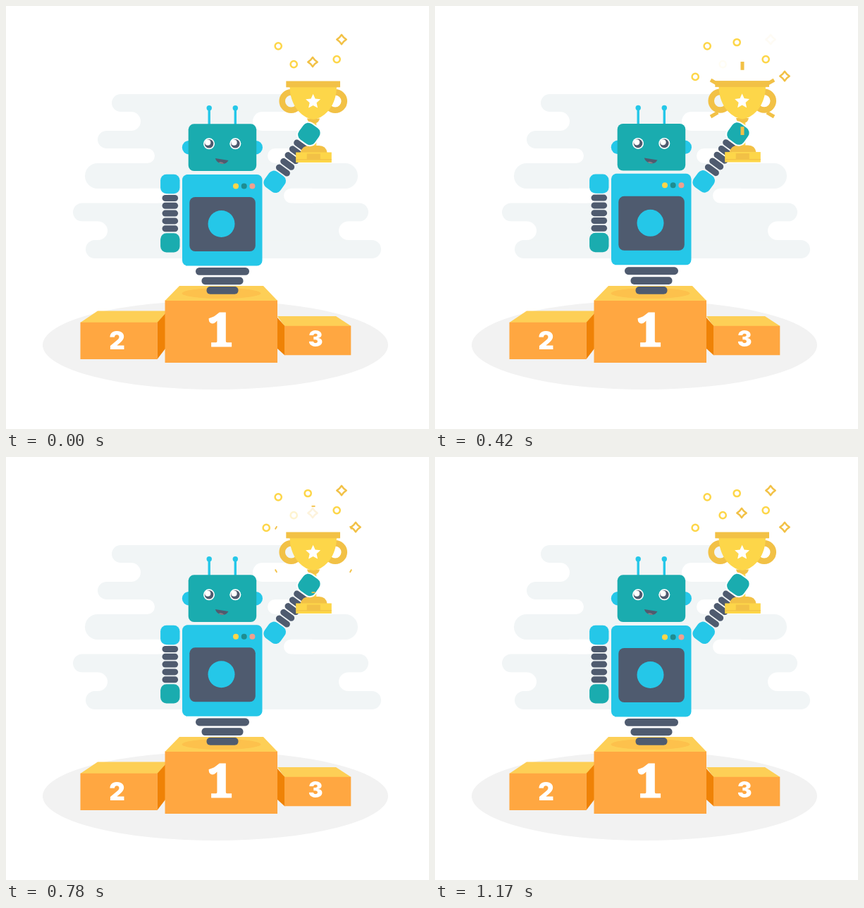
Write an HTML page that moves like this. It is 600 by 600 pixels and loops after 1800 ms.

```html
<!DOCTYPE html>
<html lang="en">
<head>
<meta charset="utf-8">
<title>Robot winner</title>
<style>
html, body { margin: 0; width: 100%; height: 100%; overflow: hidden; background: #fff; }
svg { display: block; width: 100vw; height: 100vh; }
text { fill: #fff; text-anchor: middle; font-weight: 900; }
</style>
</head>
<body>
<svg viewBox="0 0 600 600">
  <defs>
    <g id="coils" fill="#4f5b6f">
      <rect x="-11.3" y="15.5" width="22.6" height="9" rx="4.5"/>
      <rect x="-11.3" y="26.3" width="22.6" height="9" rx="4.5"/>
      <rect x="-11.3" y="37.1" width="22.6" height="9" rx="4.5"/>
      <rect x="-11.3" y="47.9" width="22.6" height="9" rx="4.5"/>
      <rect x="-11.3" y="58.7" width="22.6" height="9" rx="4.5"/>
    </g>
    <rect id="joint" x="-13.7" y="-13.7" width="27.4" height="27.4" rx="8.5"/>
    <g id="eye">
      <circle r="8" fill="#fff"/>
      <circle r="6.3" fill="#4f5b6f"/>
      <circle cx="-1.8" cy="-1.6" r="4.1" fill="#fff"/>
    </g>
  </defs>

  <rect width="600" height="600" fill="#fff"/>
  <g id="cloud"></g>
  <ellipse cx="297" cy="481" rx="245" ry="63" fill="#f2f2f2"/>

  <g id="podium">
    <path d="M105.5 449L130 432.5H229L215 449Z M385 440H468L489.500 454H395Z" fill="#fdcf56"/>
    <path d="M214.500 449L226 436V486L214.500 501Z M385 442L395.500 454V495.500L385 486Z" fill="#ef8206"/>
    <path d="M105.500 448.700H214.800V501H105.500Z M395 453.700H489.300V495.300H395Z M225.500 417.500H385V506H225.500Z" fill="#ffa741"/>
    <path d="M246 397H365L385 418H225.500Z" fill="#fdcf56"/>
    <ellipse cx="305.500" cy="407.500" rx="56" ry="7.500" fill="#fdc14c"/>
    <text x="304" y="481.500" font-family="'Noto Serif', serif" font-size="63" stroke="#fff" stroke-width="3">1</text>
    <text x="157.500" y="487" font-family="Inter, sans-serif" font-size="35">2</text>
    <text x="439" y="482.800" font-family="Inter, sans-serif" font-size="31">3</text>
  </g>

  <g fill="#4f5b6f">
    <rect x="284.500" y="398" width="45" height="10.800" rx="5"/>
    <rect id="coil2" x="277.500" y="384.500" width="59" height="10.800" rx="5"/>
    <rect id="coil1" x="269" y="371" width="76" height="10.800" rx="5.400"/>
  </g>

  <g id="torso">
    <rect x="250" y="239" width="113.500" height="129.500" rx="7.500" fill="#25c7e8"/>
    <rect x="260.300" y="271" width="93.500" height="77" rx="8" fill="#4f5b6f"/>
    <circle cx="326" cy="255.500" r="4" fill="#fdd649"/>
    <circle cx="337.700" cy="255.500" r="4" fill="#1e8d91"/>
    <circle cx="349.400" cy="255.500" r="4" fill="#f0a08f"/>
    <circle cx="305.500" cy="309" r="19" fill="#25c7e8"/>
  </g>

  <g id="upper">
    <g transform="translate(232.800 252.500)">
      <use href="#coils"/>
      <use href="#joint" fill="#25c7e8"/>
      <use href="#joint" y="83.400" fill="#1aacaf"/>
    </g>

    <g fill="#25c7e8">
      <circle cx="259.500" cy="200.700" r="9.700"/>
      <circle cx="354.300" cy="200.700" r="9.700"/>
      <circle cx="288.200" cy="144.800" r="3.700"/>
      <circle cx="325.300" cy="144.800" r="3.700"/>
      <path d="M286.500 145h3.400v23h-3.400z M323.600 145h3.400v23h-3.400z"/>
    </g>
    <rect x="258.700" y="167.300" width="96.500" height="66.700" rx="8" fill="#1aacaf"/>
    <use href="#eye" x="288" y="195.300"/>
    <use href="#eye" x="325.300" y="195.300"/>
    <path d="M296.800 216L315.500 219Q312 225 305.500 223.700Q298.500 222 296.800 216Z" fill="#4f5b6f"/>
    <path d="M301.500 222Q305 219.800 309.500 223.500Q305 224.700 301.500 222Z" fill="#8a7f86"/>

    <g transform="translate(381.200 249.300) rotate(215.800)">
      <use href="#coils"/>
      <use href="#joint" fill="#25c7e8"/>
    </g>

    <g id="trophy">
      <g fill="none" stroke="#f2c146" stroke-width="8.500">
        <circle cx="404.500" cy="135" r="12.800"/>
        <circle cx="467" cy="135" r="12.800"/>
      </g>
      <path d="M432.300 163h8v38h-8z" fill="#fdd649"/>
      <path d="M427 159.500H445Q443.500 166 439 166H433Q428.500 166 427 159.500Z" fill="#f2c146"/>
      <path d="M402.500 114H469C469 139 454 158.500 436 161C417.500 158.500 402.500 139 402.500 114Z" fill="#fdd649"/>
      <rect x="397.300" y="106.500" width="76.700" height="8.800" fill="#f2c146"/>
      <path id="star" fill="#fff"/>
      <path d="M417.500 208Q420 198 430 198H444Q454 198 455.500 208Z" fill="#f2c146"/>
      <rect x="411.200" y="207.500" width="50.600" height="14.500" fill="#fdd649"/>
      <path d="M426.800 209.500h19v8h-19z M411.200 217.300h50.600v1.300h-50.600z" fill="#f2c146"/>
    </g>

    <use href="#joint" transform="translate(429.900 181.400) rotate(215.800)" fill="#1aacaf" stroke="#fff" stroke-width="4" paint-order="stroke"/>
  </g>

  <g id="confetti" fill="none" stroke-width="2.500" stroke-linejoin="round"></g>
  <g id="burst" stroke="#f2c146" stroke-width="5"></g>
</svg>

<script>
const $ = id => document.getElementById(id);
const LOOP = 1800, STEP = 30, END = 1170;

function add(parent, tag, attrs) {
  const el = document.createElementNS('http://www.w3.org/2000/svg', tag);
  for (const k in attrs) el.setAttribute(k, attrs[k]);
  return parent.appendChild(el);
}

function bar(x1, x2, y1, y2, fill, r) {
  add($('cloud'), 'rect', { x: x1, y: y1, width: x2 - x1, height: y2 - y1, rx: r, fill });
}

// Backdrop: pale bars joined by bridges, with round white notches cut in
const PALE = '#f1f5f6';
[[150, 412, 125, 150], [130, 426, 177, 202], [112, 499, 223, 259],
 [95, 514, 279.5, 305.5], [113, 532, 332, 358]]
  .forEach(([a, b, y1, y2]) => bar(a, b, y1, y2, PALE, (y2 - y1) / 2));
[[191, 350, 150, 177], [211, 371, 202, 223], [230, 394, 258.7, 279.5], [144, 472, 305.5, 332]]
  .forEach(([a, b, y1, y2]) => {
    bar(a - 14, b + 14, y1 - 0.5, y2 + 0.5, PALE, 0);
    bar(a - 50, a, y1, y2, '#fff', (y2 - y1) / 2);
    bar(b, b + 50, y1, y2, '#fff', (y2 - y1) / 2);
  });

// Star on the cup
const spikes = [];
for (let i = 0; i < 10; i++) {
  const r = i % 2 ? 5.2 : 11, a = (i * 36 - 90) * Math.PI / 180;
  spikes.push((435.6 + r * Math.cos(a)).toFixed(2) + ' ' + (135.7 + r * Math.sin(a)).toFixed(2));
}
$('star').setAttribute('d', 'M' + spikes.join('L') + 'Z');

// Confetti: place, shape and opacity keys [time, value]
const SHOWN = [[0, 1]];
const APPEAR = [[0, 0], [300, 1]];
const confetti = [
  [386.2, 56.8, 'ring', SHOWN],
  [428.2, 51.5, 'ring', APPEAR],
  [408.2, 82.7, 'ring', [[180, 1], [300, 0.4], [390, 0.06], [740, 0.06], [930, 1]]],
  [469.2, 75.6, 'ring', SHOWN],
  [369.2, 100.4, 'ring', APPEAR],
  [476, 47.5, 'gem', [[180, 1], [300, 0.55], [420, 0.06], [540, 0.06], [780, 1]]],
  [435, 79.4, 'gem', [[180, 1], [300, 0.5], [420, 0], [690, 0], [930, 0.5], [1080, 1]]],
  [496, 99.5, 'gem', APPEAR]
].map(([x, y, kind, keys]) => {
  const transform = `translate(${x} ${y})`;
  const el = kind === 'ring'
    ? add($('confetti'), 'circle', { r: 4.6, stroke: '#fdd649', transform })
    : add($('confetti'), 'path', {
        d: 'M0-6.7L2.9-2.900L6.7 0L2.9 2.900L0 6.700L-2.900 2.900L-6.700 0L-2.900-2.900Z',
        stroke: '#f2c146', transform
      });
  return { el, keys };
});

const rays = [-90, -30, 30, 90, 150, 210].map(deg =>
  add($('burst'), 'line', { transform: `translate(436 131) rotate(${deg})` }));

function track(keys, t) {
  if (t <= keys[0][0]) return keys[0][1];
  for (let i = 1; i < keys.length; i++) {
    const [t0, v0] = keys[i - 1], [t1, v1] = keys[i];
    if (t < t1) return v0 + (v1 - v0) * (t - t0) / (t1 - t0);
  }
  return keys[keys.length - 1][1];
}

// Three hops, then rest
function hop(t, period) {
  return t >= period * 3 ? 0 : (1 - Math.cos(2 * Math.PI * t / period)) / 2;
}

function reach(t, start) {
  return t < start ? 0 : 64 * (1 - Math.exp((start - t) / 195));
}

function shift(id, y) {
  $(id).setAttribute('transform', `translate(0 ${-y})`);
}

function draw(time) {
  const t = Math.min(END, Math.floor(time % LOOP / STEP) * STEP);
  const body = hop(t, 371);
  shift('upper', 7.2 * hop(t, 390));
  shift('torso', 7 * body);
  shift('coil1', 4 * body);
  shift('coil2', 2 * body);

  for (const { el, keys } of confetti) el.setAttribute('opacity', track(keys, t));

  const head = reach(t, 94), tail = Math.max(3.5, reach(t, 227));
  $('burst').setAttribute('visibility', head > tail && t < 1050 ? 'visible' : 'hidden');
  for (const ray of rays) {
    ray.setAttribute('x1', tail);
    ray.setAttribute('x2', head);
  }
}

const begin = performance.now();
function tick() {
  draw(performance.now() - begin);
  requestAnimationFrame(tick);
}
draw(0);
requestAnimationFrame(tick);
</script>
</body>
</html>
```
